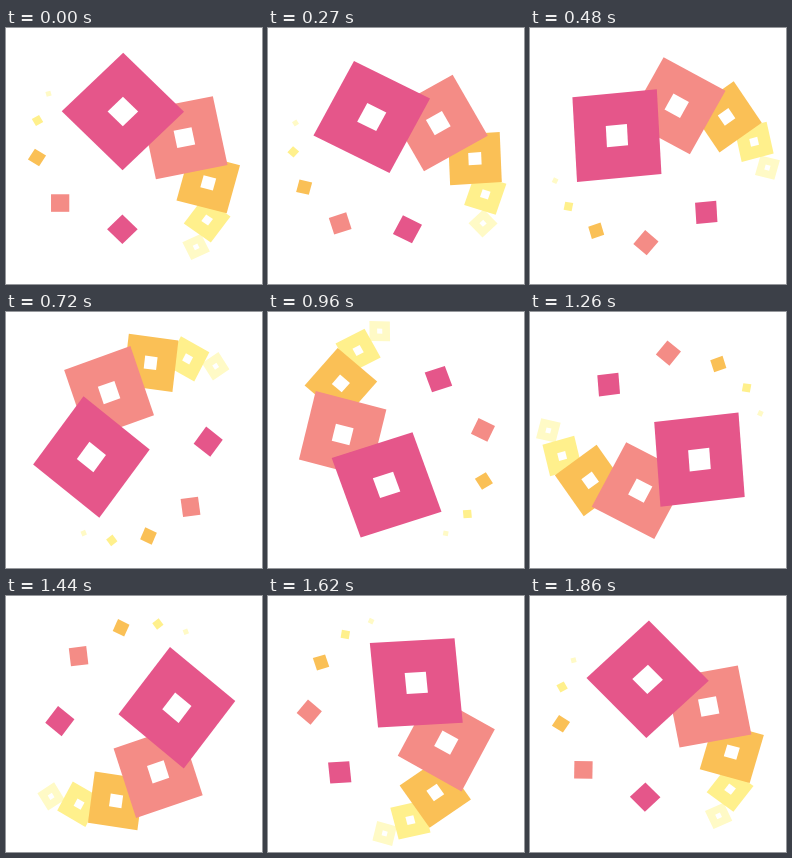
Recreate the animation shown at these times as an HTML page. Size 256x256 px, loop 1.89 s.

```html
<!DOCTYPE html>
<html lang="en">
<head>
<meta charset="utf-8">
<title>Spinning squares</title>
<style>
  html, body { margin: 0; width: 100%; height: 100%; overflow: hidden; background: #fff; }
  svg { display: block; width: 100vw; height: 100vh; }
</style>
</head>
<body>
<svg viewBox="0 0 256 256">
  <g id="spinner"><g id="squares" transform="scale(1.02 .98)"></g></g>
</svg>
<script>
  const LOOP = 1890, STEP = 30;
  const PINK = '#e5568a', SALMON = '#f48c86', ORANGE = '#fac056',
        YELLOW = '#fff08c', PALE = '#fffac6';

  // x, y (from the centre), side, angle, colour, framed: back to front
  const SQUARES = [
    [60.9, 92.7, 20.2, 64.4, PALE, true],
    [71.7, 65.3, 32.8, 36, YELLOW, true],
    [72.8, 27.4, 50.9, 14.9, ORANGE, true],
    [49.4, -18.7, 71.7, -11.6, SALMON, true],
    [-10.9, -45.4, 84.8, 45.3, PINK, true],
    [-11.4, 74.8, 21.2, 45, PINK],
    [-72.4, 48, 17.9, 0, SALMON],
    [-95.1, 1.5, 12.9, 32, ORANGE],
    [-94.6, -36.2, 8.2, 60, YELLOW],
    [-83.8, -63.6, 5, 75, PALE]
  ];

  const spinner = document.getElementById('spinner');
  const squares = document.getElementById('squares');

  function addSquare(x, y, side, angle, fill) {
    const rect = document.createElementNS('http://www.w3.org/2000/svg', 'rect');
    const attrs = {
      x: -side / 2, y: -side / 2, width: side, height: side, fill,
      transform: `translate(${x} ${y}) rotate(${angle})`
    };
    for (const name in attrs) rect.setAttribute(name, attrs[name]);
    squares.append(rect);
  }

  for (const [x, y, side, angle, fill, framed] of SQUARES) {
    addSquare(x, y, side, angle, fill);
    if (framed) addSquare(x, y, side / 4, angle, '#fff');
  }

  // cubic-bezier(1/3, 0, 5/6, 1), solved by bisection
  function ease(x) {
    let lo = 0, hi = 1;
    for (let i = 0; i < 30; i++) {
      const s = (lo + hi) / 2, r = 1 - s;
      if (s * r * r + 2.5 * s * s * r + s ** 3 < x) lo = s;
      else hi = s;
    }
    return lo * lo * (3 - 2 * lo);
  }

  function draw(now) {
    const t = Math.floor((now % LOOP) / STEP) * STEP;
    spinner.setAttribute('transform', `translate(128 128) rotate(${-360 * ease(t / LOOP)})`);
  }

  function tick() {
    draw(performance.now());
    requestAnimationFrame(tick);
  }

  draw(0);
  requestAnimationFrame(tick);
</script>
</body>
</html>
```
